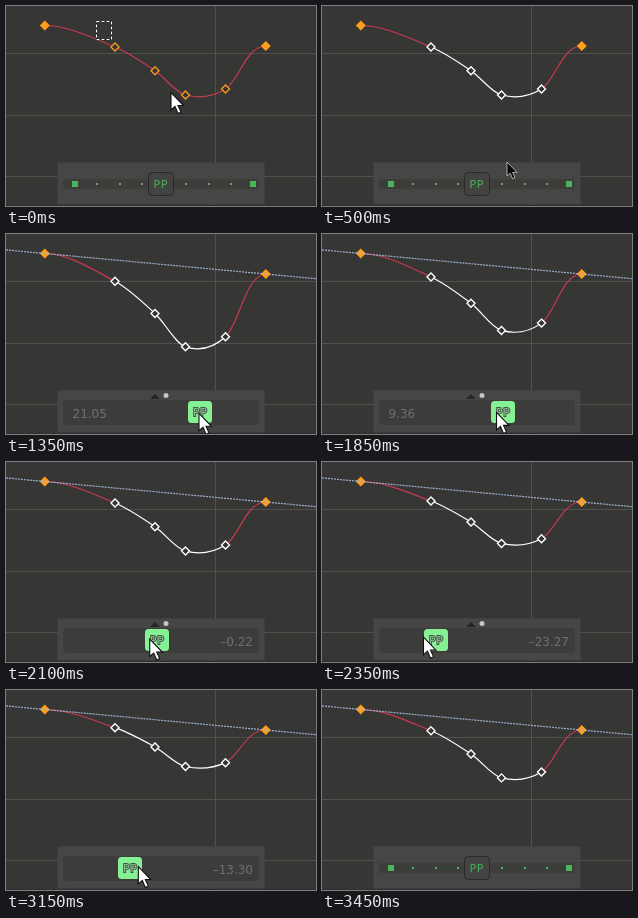
Animation, 310 px wide and 200 px high, one loop 3500 ms. Source, as an HTML page:

```html
<!DOCTYPE html>
<html lang="en">
<head>
<meta charset="utf-8">
<title>Curve slider</title>
<style>
  html, body { margin: 0; width: 100%; height: 100%; overflow: hidden; background: #363634; }
  svg { display: block; width: 310px; height: 200px; }
  text { font: 12px "DejaVu Sans", sans-serif; }
  .label { font-size: 11px; letter-spacing: .6px; text-anchor: middle; }
  .grid { stroke: #50504d; fill: none; }
  .curve { fill: none; stroke-width: 1.2; }
  .end { fill: #ff9d1c; }
  .key { fill: #333331; stroke: #f59a22; stroke-width: 1.4; }
  .key.on { stroke: #fff; }
  .dots { fill: #4bb45c; }
  .value { fill: #6f6f6d; }
</style>
</head>
<body>
<svg viewBox="0 0 310 200">
  <rect width="310" height="200" fill="#363634"/>
  <path class="grid" d="M0 47.5H310M0 109.5H310M0 170.5H310M209.5 0V200"/>

  <path id="red" class="curve" stroke="#c63a50"/>
  <path id="white" class="curve" stroke="#fff"/>
  <path class="end" d="M38.8 14.500l5 5-5 5-5-5zM259.800 35l5 5-5 5-5-5z"/>
  <g id="keys"></g>
  <path id="line" d="M0 15.900L310 44.700" stroke="#9fb0d2" stroke-width="1.200" stroke-dasharray="2 1"/>

  <rect x="51.500" y="156.500" width="207" height="42" fill="#464644"/>
  <rect y="199" width="310" height="1" fill="#2f2c2c"/>
  <g id="idle">
    <rect x="57" y="173" width="196" height="10" rx="3" fill="#3d3d3b"/>
    <g id="dots" class="dots"></g>
    <rect x="142.500" y="166.500" width="25" height="23" rx="4" fill="#434341" stroke="#292928"/>
    <text class="label" x="154.800" y="182" fill="#46b058">PP</text>
  </g>
  <g id="drag">
    <rect x="57" y="166" width="196" height="25" rx="4" fill="#3c3c3a"/>
    <g id="hint">
      <path d="M144 165l5-5 5 5z" fill="#262625"/>
      <circle cx="160" cy="161.500" r="2.500" fill="#c4c4c2"/>
    </g>
    <text id="value" class="value" y="184"></text>
    <g id="button">
      <rect x="-12" y="167" width="24" height="22" rx="3.500" fill="#86f095"/>
      <text class="label" x=".3" y="182" fill="#98b89b" stroke="#3f5a43" stroke-width="1.800"
        paint-order="stroke">PP</text>
    </g>
  </g>

  <g id="marquee" fill="none">
    <rect x="90.500" y="15.500" stroke="#111"/>
    <rect x="90.500" y="15.500" stroke="#fff" stroke-dasharray="3 2"/>
  </g>
  <path id="cursor" d="M0 0V17.500L4 14L7 21L10 19.500L7 13H12.500Z" stroke-width="1.100"/>
</svg>
<script>
const LOOP = 3500, STEP = 50, MID = 155, REACH = 85;
const $ = id => document.getElementById(id);
const show = (id, on) => $(id).style.display = on ? "" : "none";
const progress = (t, from, to) => Math.min(1, Math.max(0, (t - from) / (to - from)));

const points = [[38.5, 19.5], [109, 41], [149, 64.7], [179.5, 89], [219.5, 83], [259.5, 40]];
const baseline = x => 19.5 + (x - 38.5) * 20.5 / 221;

// Pointer strokes along the slider: start, end, distance
const strokes = [[600, 1200, 67], [1200, 1300, -28], [1640, 2200, -63], [2200, 2450, -54], [2780, 3200, 66]];
const offset = t => strokes.reduce((d, [from, to, way]) => d + way * progress(t, from, to) ** 1.25, 0);
const percent = d => Math.sign(d) * (d / REACH) ** 2 * 100;

function pointer(t) {
  if (t >= 600) {
    const d = offset(t);
    return [MID - 1 + d, 177.5 + d * .045];
  }
  const p = progress(t, 0, 500);
  return [165 + 20 * p + 73 * Math.sin(Math.PI * p), 86.5 + 69.5 * p];
}

for (let i = 0; i < 9; i++) {
  const size = i % 8 ? 2 : 6;
  $("dots").innerHTML += `<rect x="${Math.round(69 + 22.25 * i - size / 2)}" y="${178 - size / 2}"
    width="${size}" height="${size}"/>`;
}
for (let i = 1; i < 5; i++)
  $("keys").innerHTML += `<path class="key" d="M0-4l4 4-4 4-4-4z"/>`;

function drawCurve(amount, selected) {
  const p = points.map(([x, y]) => [x, baseline(x) + (y - baseline(x)) * amount]);
  const slope = p.map((_, i) => i % 5 ? (p[i + 1][1] - p[i - 1][1]) / (p[i + 1][0] - p[i - 1][0]) : 0);
  const part = (i, handle = 1 / 3) => {
    const [a, b] = p[i], [c, d] = p[i + 1], h = (c - a) / 3, k = (c - a) * handle;
    return `M${a} ${b}C${a + h} ${b + h * slope[i]} ${c - k} ${d - k * slope[i + 1]} ${c} ${d}`;
  };
  const inner = part(1) + part(2) + part(3);
  $("red").setAttribute("d", part(0) + (selected ? "" : inner) + part(4, .48));
  $("white").setAttribute("d", selected ? inner : "");
  [...$("keys").children].forEach((key, i) => {
    key.setAttribute("transform", `translate(${p[i + 1]})`);
    key.classList.toggle("on", selected);
  });
}

function drawSlider(d) {
  const v = percent(d), text = $("value");
  $("button").setAttribute("transform", `translate(${MID + d} 0)`);
  text.textContent = (v < 0 ? "\u2013" : "") + Math.abs(v).toFixed(2);
  text.setAttribute("x", v < 0 ? 247 : 66.5);
  text.setAttribute("text-anchor", v < 0 ? "end" : "start");
}

function drawMarquee(t) {
  const p = progress(t, 0, 150);
  for (const r of $("marquee").children) {
    r.setAttribute("width", 15 + 130 * p);
    r.setAttribute("height", 18 + 75 * p);
  }
}

function drawCursor(t) {
  const dark = t >= 500 && t < 600, c = $("cursor");
  c.setAttribute("transform", `translate(${pointer(t)}) scale(${dark ? .8 : 1})`);
  c.setAttribute("fill", dark ? "#080808" : "#fff");
  c.setAttribute("stroke", dark ? "#bbb" : "#111");
}

function render(t) {
  const dragging = t >= 600 && t < 3400, selected = t >= 200;
  show("line", t >= 550);
  show("idle", !dragging);
  show("drag", dragging);
  show("hint", t < 2600);
  show("marquee", !selected);
  show("cursor", t < 3450);
  // Button and curve trail the pointer by one and two steps
  drawCurve(1 + percent(offset(t - 2 * STEP)) / 100, selected);
  drawSlider(Math.round(offset(t - STEP)));
  drawMarquee(t);
  drawCursor(t);
}

const start = performance.now();
function tick() {
  const t = (performance.now() - start) % LOOP;
  render(Math.floor(t / STEP) * STEP);
  requestAnimationFrame(tick);
}
tick();
</script>
</body>
</html>
```
